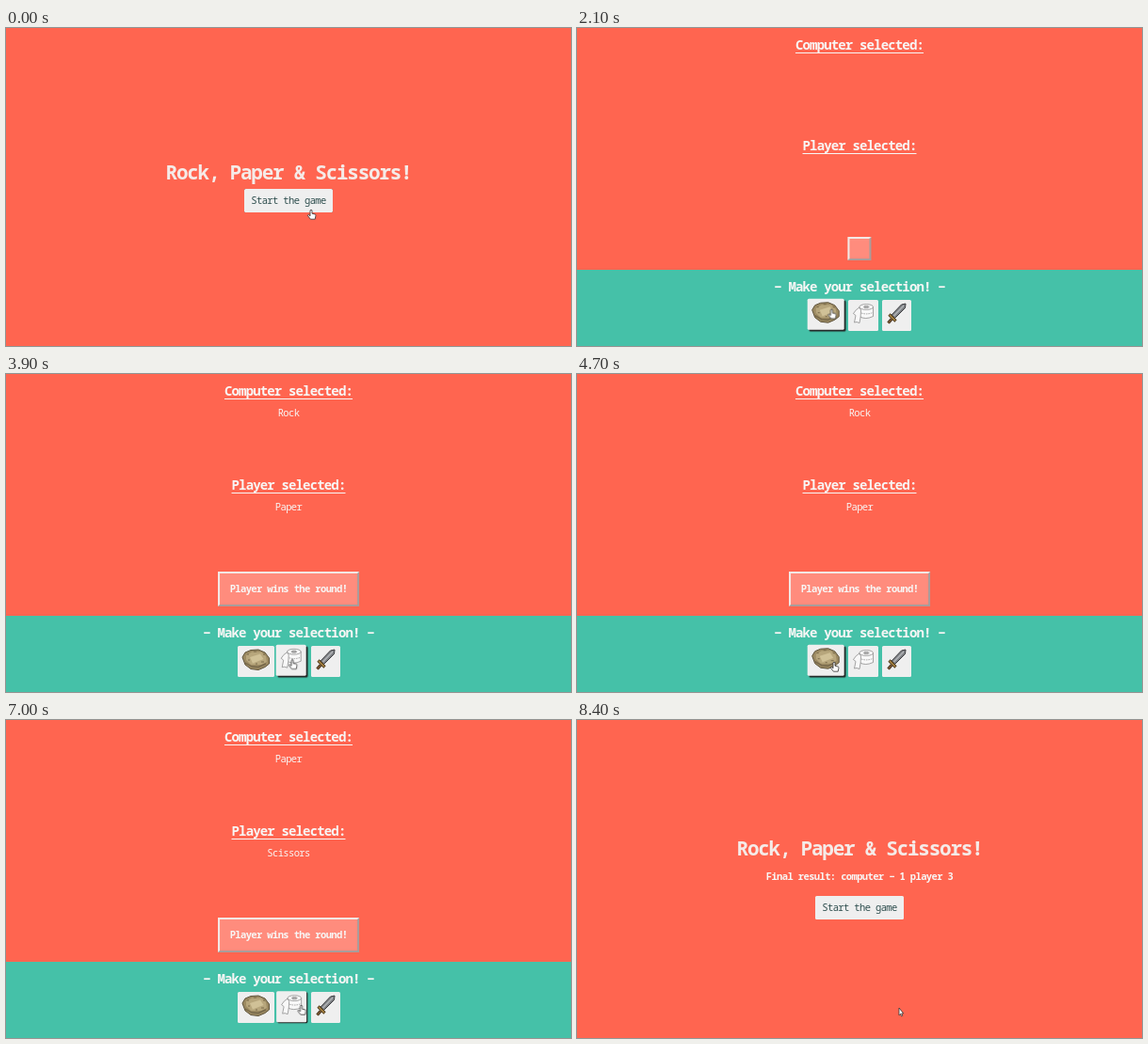
These frames come from a looping animation (600 by 338 pixels, 8900 ms). An HTML page without scripts:

```html
<!DOCTYPE html>
<html lang="en">
<head>
<meta charset="utf-8">
<title>Rock, Paper &amp; Scissors</title>
<style>
@property --h { syntax: "<number>"; inherits: true; initial-value: 0; }

* {
  box-sizing: border-box;
  margin: 0;
  letter-spacing: calc(.54em - 1ch);
}
html, body { width: 100%; height: 100%; overflow: hidden; background: #ff6550; }
body {
  position: relative;
  font: 10.5px/20px "Noto Sans Mono", "DejaVu Sans Mono", monospace;
  font-stretch: semi-condensed;
  color: #f8f6f5;
}
.scene, .round { position: absolute; inset: 0; }
.scene, .round, .empty, .player { animation: 8.9s step-end infinite; }

p, h1, h2 {
  position: absolute;
  left: 0;
  width: 600px;
  text-align: center;
  white-space: pre;
}
h1 { font-size: 21px; font-weight: 600; top: 142.5px; color: #f5ebe8; }
h2 { font-size: 14px; }
.label {
  text-decoration: underline 1px;
  text-underline-offset: 2.5px;
  text-decoration-skip-ink: none;
}
.computer { top: 8px; }
.player { top: 108px; animation-name: rise; }
.pick1 { top: 31px; }
.pick2 { top: 131px; }

/* buttons: --h runs from rest (0) to hovered (1) */
.btn {
  position: absolute;
  background: #efefef;
  border-radius: 1.5px;
  color: #2f4f4f;
  text-align: center;
  transform: translate(calc(var(--h) * -1.3px), calc(var(--h) * -1.3px));
  box-shadow: calc(var(--h) * 1.8px) calc(var(--h) * 1.8px) calc(var(--h) * 1px) #222;
  animation: 8.9s linear infinite;
}
.start { left: 253px; top: 171px; width: 94px; height: 25px; line-height: 25px; }
.tool { top: 289px; height: 33px; }
.tool svg { position: absolute; inset: 0; overflow: visible; }

.bar { position: absolute; left: 0; top: 257px; width: 100%; height: 81px; background: #45c1a8; }
.bar h2 { top: 8px; }

.box {
  position: absolute;
  left: 50%;
  bottom: 91px;
  transform: translateX(-50%);
  padding: 10.6px;
  border: 2px solid;
  border-color: #f3e9e6 #a99c9b #a99c9b #f3e9e6;
  background: #ff8c7d;
  font-weight: 700;
  line-height: 12px;
  white-space: pre;
}

.intro { animation-name: intro; }
.game { animation-name: game; }
.final { animation-name: final; }
.final h1 { top: 126px; }
.final p { top: 156px; font-weight: 700; }
.final .start { top: 187px; }
.empty { animation-name: empty; }
.r1 { animation-name: r1; }
.r2 { animation-name: r2; }
.r3 { animation-name: r3; }
.r4 { animation-name: r4; }
.intro .start { animation-name: startHover; }
.rock { left: 246px; width: 39px; animation-name: rockHover; }
.paper { left: 288px; width: 32px; animation-name: paperHover; }
.blade { left: 324px; width: 31px; animation-name: bladeHover; }

.cursor {
  position: absolute;
  left: 0;
  top: 0;
  width: 1px;
  height: 1px;
  overflow: visible;
  fill: #fff;
  stroke: #333;
  stroke-width: .8;
  stroke-linejoin: round;
  animation: path 8.9s infinite, point 8.9s step-end infinite;
}
.hand { opacity: var(--h); }
.arrow { opacity: calc(1 - var(--h)); }

@keyframes intro { 0% { opacity: 1 } 10.11%, to { opacity: 0 } }
@keyframes game { 0% { opacity: 0 } 10.11% { opacity: 1 } 93.25%, to { opacity: 0 } }
@keyframes final { 0% { opacity: 0 } 93.25%, to { opacity: 1 } }
@keyframes rise { 0% { top: 114.5px } 34.83%, to { top: 108px } }
@keyframes empty { 0% { opacity: 1 } 34.83%, to { opacity: 0 } }
@keyframes r1 { 0% { opacity: 0 } 34.83% { opacity: 1 } 53.93%, to { opacity: 0 } }
@keyframes r2 { 0% { opacity: 0 } 53.93% { opacity: 1 } 70.78%, to { opacity: 0 } }
@keyframes r3 { 0% { opacity: 0 } 70.78% { opacity: 1 } 83.14%, to { opacity: 0 } }
@keyframes r4 { 0% { opacity: 0 } 83.14%, to { opacity: 1 } }

@keyframes startHover { 0% { --h: 0 } 3.37%, to { --h: 1 } }
@keyframes rockHover {
  0%, 20.22% { --h: 0 }
  23.6%, 26.96% { --h: 1 }
  30.33%, 47.19% { --h: 0 }
  50.56%, 55.05% { --h: 1 }
  58.42%, to { --h: 0 }
}
@keyframes paperHover {
  0%, 28.08% { --h: 0 }
  31.46%, 44.94% { --h: 1 }
  48.31%, 76.4% { --h: 0 }
  79.77%, 86.51% { --h: 1 }
  89.88%, to { --h: 0 }
}
@keyframes bladeHover {
  0%, 64.04% { --h: 0 }
  67.41%, 75.28% { --h: 1 }
  78.65%, 87.64% { --h: 0 }
  91.01%, to { --h: 1 }
}

@keyframes path {
  0% { transform: translate(324px, 193px); animation-timing-function: steps(7) }
  7.86%, 14.6% { transform: translate(306.5px, 184px); animation-timing-function: steps(3) }
  17.97% { transform: translate(295px, 225px); animation-timing-function: steps(3) }
  21.34% { transform: translate(275px, 290px); animation-timing-function: steps(3) }
  24.71% { transform: translate(268px, 303px); animation-timing-function: steps(4) }
  29.21% { transform: translate(315px, 301px); animation-timing-function: steps(2) }
  31.46%, 34.83% { transform: translate(305px, 295px); animation-timing-function: steps(7) }
  42.69% { transform: translate(308px, 303px); animation-timing-function: steps(9) }
  52.8%, 53.93% { transform: translate(273px, 306px); animation-timing-function: steps(3) }
  57.3% { transform: translate(294px, 322px); animation-timing-function: steps(5) }
  62.92% { transform: translate(349px, 322px); animation-timing-function: steps(5) }
  68.53%, 75.28% { transform: translate(340px, 304px); animation-timing-function: steps(3) }
  78.65% { transform: translate(313.5px, 303px); animation-timing-function: steps(6) }
  85.39% { transform: translate(308px, 302px); animation-timing-function: steps(5) }
  91.01%, to { transform: translate(342px, 306px) }
}
@keyframes point {
  0% { --h: 1 }
  10.11% { --h: 0 }
  21.34% { --h: 1 }
  57.3% { --h: 0 }
  64.04% { --h: 1 }
  94.38%, to { --h: 0 }
}
</style>
</head>
<body>

<div class="scene intro">
  <h1>Rock, Paper &amp; Scissors!</h1>
  <div class="btn start">Start the game</div>
</div>

<div class="scene game">
  <h2 class="computer"><span class="label">Computer selected:</span></h2>
  <h2 class="player"><span class="label">Player selected:</span></h2>
  <div class="box empty"></div>

  <div class="round r1">
    <p class="pick1">Rock</p>
    <p class="pick2">Paper</p>
    <div class="box">Player wins the round!</div>
  </div>
  <div class="round r2">
    <p class="pick1">Paper</p>
    <p class="pick2">Rock</p>
    <div class="box">Computer wins the round!</div>
  </div>
  <div class="round r3">
    <p class="pick1">Paper</p>
    <p class="pick2">Scissors</p>
    <div class="box">Player wins the round!</div>
  </div>
  <div class="round r4">
    <p class="pick1">Paper</p>
    <p class="pick2">Paper</p>
    <div class="box">Nobody wins, it's a draw!</div>
  </div>

  <div class="bar"><h2>− Make your selection! −</h2></div>

  <div class="btn tool rock">
    <svg width="39" height="33" stroke-linejoin="round">
      <path d="M5 12L8 7L14 4.500L22 4L29 7L33.500 13V19L29 22.500L22 25.500L14 24.500L8 20Z" fill="#9c8a62" stroke="#5f543c"/>
      <path d="M9 10L15 6.500L25 6.500L30 11L31 17L25 20L14 20L9 15Z" fill="#b7a67c"/>
      <path d="M13 12L24 8.500L27.500 14L16 18.500Z" fill="#d0c197"/>
      <path d="M8 18L15 22L22 22.500L30 19" fill="none" stroke="#75674a" stroke-width="1.400"/>
      <path d="M10 9h2m5-3h3m7 3h2m-18 6h2m12 2h3m-9 2h2" stroke="#7a6b4b"/>
    </svg>
  </div>
  <div class="btn tool paper">
    <svg width="32" height="33" fill="#f8f8f8" stroke="#808080" stroke-width=".7">
      <path d="M12 7.500V17.500Q18 21.500 26.500 17.500V7.500Z"/>
      <path d="M12 8Q8 10 5.500 14.500L8 16.500L6.500 24L9 23.500L12 24.500Q13.500 18 13.500 11Z"/>
      <ellipse cx="19.200" cy="7.500" rx="7.300" ry="2.900"/>
      <ellipse cx="19.200" cy="7.500" rx="2.800" ry="1.100" fill="#b5b5b5"/>
      <path d="M14 14Q20 16 26 13.500" fill="none" stroke-dasharray="1.500 1"/>
    </svg>
  </div>
  <div class="btn tool blade">
    <svg width="31" height="33" stroke-linejoin="round">
      <path d="M25 4L24.500 8.500L13.500 19.500L10 16L20.500 5Z" fill="#808387" stroke="#3d3d40"/>
      <path d="M23 6L12.500 17" stroke="#b4b6b9" stroke-width="1.200"/>
      <path d="M10 20.500L6.500 24.500" stroke="#42301f" stroke-width="3.400"/>
      <path d="M10 20.500L6.500 24.500" stroke="#7d5630" stroke-width="1.500"/>
      <path d="M7.500 15.500L14.500 22.500" stroke="#4a3718" stroke-width="3.200"/>
      <path d="M8 16L14 22" stroke="#b18a45" stroke-width="1.500"/>
    </svg>
  </div>
</div>

<div class="scene final">
  <h1>Rock, Paper &amp; Scissors!</h1>
  <p>Final result: computer − 1 player 3</p>
  <div class="btn start">Start the game</div>
</div>

<svg class="cursor">
  <path class="arrow" d="M0 0V7.800L1.500 6.300L2.500 8.900L3.700 8.400L2.700 5.900H4.700Z"/>
  <path class="hand" d="M-1 .8Q0-.6 1 .8V4.200L4.200 5Q5.200 5.300 4.900 6.600L4.200 10.200H-.6L-3.400 6.600Q-3.800 5.400-2.500 5.600L-1 6.800Z"/>
</svg>

</body>
</html>
```
